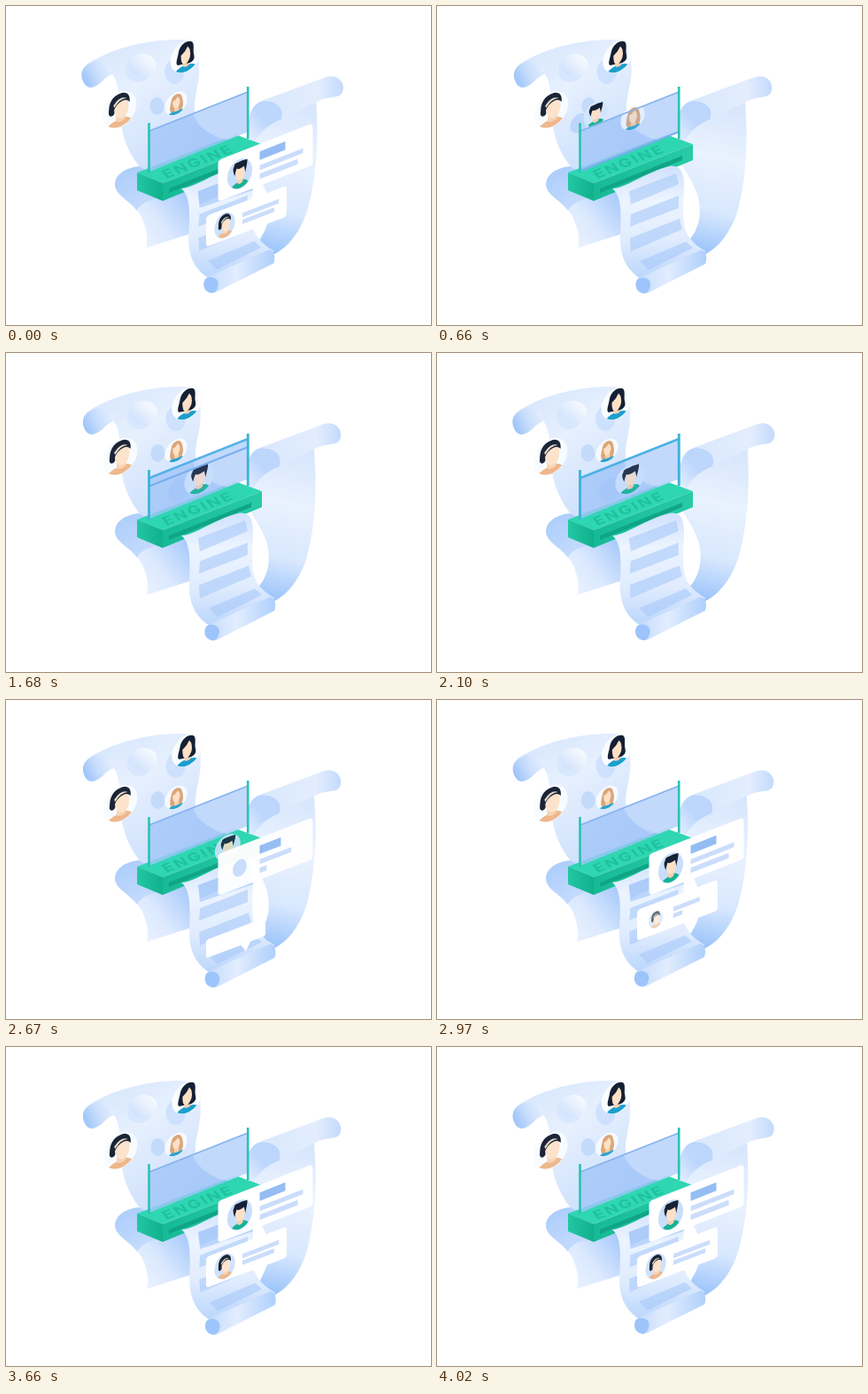
Write an HTML page that moves like this. It is 480 px wide and 360 px high and loops after 4.05 s.

```html
<!DOCTYPE html>
<html lang="en">
<head>
<meta charset="utf-8">
<title>Engine</title>
<style>
html, body { margin: 0; width: 100%; height: 100%; overflow: hidden; background: #fff; }
svg { display: block; width: 100vw; height: 100vh; }
text { font: bold 18.5px Inter, Arial, sans-serif; letter-spacing: 2.4px; }
</style>
</head>
<body>
<svg viewBox="0 0 480 360">
<defs>
  <linearGradient id="curl" x1="0" y1=".7" x2="1" y2=".3"><stop stop-color="#9ac3fa"/><stop offset=".45" stop-color="#c6dcfc"/><stop offset="1" stop-color="#e6effe"/></linearGradient>
  <linearGradient id="sheet" x1="0" y1="0" x2=".7" y2="1"><stop stop-color="#d3e4fd"/><stop offset=".4" stop-color="#e6f0fe"/><stop offset="1" stop-color="#c8dcfc"/></linearGradient>
  <linearGradient id="under" x1="0" y1=".9" x2="1" y2=".1"><stop stop-color="#f4f8ff"/><stop offset=".45" stop-color="#dbe9fe"/><stop offset="1" stop-color="#8ebafa"/></linearGradient>
  <linearGradient id="fold" x1="0" y1="0" x2="1" y2=".5"><stop stop-color="#94c0fa"/><stop offset=".5" stop-color="#accdfb"/><stop offset="1" stop-color="#c5dcfc"/></linearGradient>
  <linearGradient id="right" x1=".4" y1="0" x2=".3" y2="1"><stop stop-color="#d7e6fd"/><stop offset=".35" stop-color="#e9f2fe"/><stop offset=".7" stop-color="#d9e8fe"/><stop offset="1" stop-color="#96c1fa"/></linearGradient>
  <linearGradient id="rightRoll"><stop stop-color="#d9e8fd"/><stop offset=".7" stop-color="#e3edfe"/><stop offset="1" stop-color="#c3dafc"/></linearGradient>
  <linearGradient id="rightCurl" x1="0" y1="1" x2="1" y2="0"><stop stop-color="#e6f0fe"/><stop offset=".5" stop-color="#bcd6fc"/><stop offset="1" stop-color="#bcd6fc"/></linearGradient>
  <linearGradient id="front" x1="0" y1="0" x2="0" y2="1"><stop stop-color="#cfe1fd"/><stop offset=".3" stop-color="#ecf4ff"/><stop offset=".65" stop-color="#e0ecfe"/><stop offset="1" stop-color="#b9d5fc"/></linearGradient>
  <linearGradient id="frontRoll"><stop stop-color="#c3dafc"/><stop offset=".45" stop-color="#e2edfe"/><stop offset="1" stop-color="#aecffc"/></linearGradient>
  <linearGradient id="glass"><stop stop-color="#a9caf8"/><stop offset="1" stop-color="#a3c7f8"/></linearGradient>
  <linearGradient id="shade" x1="1" y1="0" x2="0" y2="1"><stop stop-color="#fff"/><stop offset=".6" stop-color="#dfebfd"/><stop offset="1" stop-color="#cadefc"/></linearGradient>
  <linearGradient id="end"><stop stop-color="#22c7a2"/><stop offset="1" stop-color="#10b08b"/></linearGradient>
  <linearGradient id="side"><stop stop-color="#16ba95"/><stop offset="1" stop-color="#28cba7"/></linearGradient>
  <clipPath id="disc"><circle r="19.5"/></clipPath>

  <g id="girl">
    <g clip-path="url(#disc)">
      <path d="M-16 20C-13 12-6 11 0 11S14 12 18 20Z" fill="#1c9fce"/>
      <path d="M-3 5H5V12Q1 15-3 12Z" fill="#f6cfae"/>
    </g>
    <path d="M-9 8C-15 7-10-2-9-9C-7-18 2-20 7-17C13-14 10-6 11 0C12 5 13 9 6 10Z" fill="#142034"/>
    <path d="M-6-3Q0-6 3-12Q8-6 6 3Q2 12-3 9Q-6 6-6-3Z" fill="#fde0c6"/>
  </g>
  <g id="capman">
    <g clip-path="url(#disc)">
      <path d="M-18 21C-15 12-6 12 0 10S14 12 18 20Z" fill="#eeb78c"/>
      <path d="M-4 4H7V12Q1 16-4 12Z" fill="#f7d3b4"/>
    </g>
    <ellipse cx="-9" cy="0" rx="3.500" ry="4.500" fill="#1b2537"/>
    <path d="M-6-6Q2-12 10-7Q12 2 8 8Q2 13-3 7Q-7 1-6-6Z" fill="#fde3cb"/>
    <path d="M-12-1C-13-11-8-18 1-18C9-18 13-12 12-5Q9-9 4-9Q-4-8-7 0Z" fill="#1b2537"/>
    <path d="M-7-7Q1-16 9-10Q1-13-6-4Z" fill="#e9dac6"/>
  </g>
  <g id="woman">
    <g clip-path="url(#disc)">
      <path d="M-16 21C-13 12-6 13 0 12S14 13 17 21Z" fill="#2aa3cc"/>
      <path d="M-9 13C-13 7-9-4-8-9C-6-18 7-19 10-10C12-3 15 7 10 14Z" fill="#dca678"/>
      <path d="M-3 5H5V14H-3Z" fill="#f6cfae"/>
    </g>
    <path d="M-6-5Q0-6 3-11Q8-6 7 1Q4 10 0 9Q-6 7-6-5Z" fill="#fde0c6"/>
  </g>
  <g id="boy">
    <g clip-path="url(#disc)">
      <path d="M-16 21C-13 11-6 12 0 10S14 11 17 21Z" fill="#16b295"/>
      <path d="M-4 4H5V12Q0 16-4 12Z" fill="#f6cfae"/>
    </g>
    <path d="M-7-7Q0-10 8-7Q9 2 6 7Q1 11-4 7Q-7 2-7-7Z" fill="#fde0c6"/>
    <path d="M-8 1C-10-4-12-9-9-12C-9-17-3-15 1-16C5-17 9-15 12-16C13-11 10-5 9 1Q8-4 7-8Q-1-5-5-8Q-7-4-8 1Z" fill="#162135"/>
  </g>
</defs>

<g id="left">
  <path d="M87 83C83 70 95 63 106 58C130 46 170 36 205 38.500C219 41 219 56 219 73C218 96 209 112 216 127C223 143 240 150 254 156L159 190C145 177 133 156 130 132C128 112 130 86 120 76C112 78 108 90 97 92Q90 92 87 83Z" fill="url(#sheet)"/>
  <path d="M87 83C83 70 95 62 106 62C117 63 123 70 121 77C112 79 108 90 97 92Q90 92 87 83Z" fill="url(#curl)"/>
  <circle cx="150" cy="72" r="14" fill="#d3e4fd" opacity=".7"/>
  <ellipse cx="155" cy="67" rx="15" ry="13" fill="url(#shade)"/>
  <ellipse cx="191" cy="74" rx="11" ry="14" fill="#c8ddfc" opacity=".8"/>
  <ellipse cx="171" cy="113" rx="8" ry="10" fill="#c3dafb"/>
  <g transform="matrix(.85 -.31 0 .88 203.500 57)"><circle r="20" fill="#fbfdff"/><use href="#girl"/></g>
  <g transform="matrix(.97 -.34 0 1 128.500 117)"><circle r="20" fill="#f9fcff"/><use href="#capman"/></g>
</g>

<g id="lower">
  <path d="M150 181C132 183 120 193 124 206C129 219 150 222 157 247Q162 261 159 273L212 256L214 208L176 198Z" fill="url(#under)"/>
  <path d="M150 181C132 183 120 193 124 206C128 215 139 219 148 231C156 216 176 219 188 210L172 192Z" fill="url(#fold)" opacity=".7"/>
</g>

<g id="rightPaper">
  <path d="M276 118L349 104C353 150 350 196 340 231C331 259 315 275 301 281L283 266C297 253 300 232 295 214C290 198 282 188 274 174Z" fill="url(#right)"/>
  <path d="M274 150C270 130 275 108 291 107C307 107 315 118 310 128C298 132 287 141 280 153Z" fill="url(#rightCurl)"/>
  <path d="M288 107L361 80C375 76 384 89 378 99C373 105 361 101 349 109L310 127C314 115 304 106 288 107Z" fill="url(#rightRoll)"/>
</g>

<g>
  <path d="M148 188L259 145L289 156L177 200Z" fill="#2fd6b2"/>
  <path d="M148 188L177 200V220L148 208Z" fill="url(#end)"/>
  <path d="M177 200L289 156V174L177 220Z" fill="url(#side)"/>
  <path d="M184 206L277 169V174L184 211Z" fill="#0fa585"/>
  <text transform="matrix(.93 -.37 .5 .62 181 195)" fill="#1fc19f">ENGINE</text>
</g>

<path d="M162 141L273 97V142L162 187Z" fill="url(#glass)" opacity=".75"/>
<path d="M211 122L273 97V142L250 151C231 146 216 137 211 122Z" fill="#d8e7fd" opacity=".65"/>

<g id="womanMove">
  <circle r="20" fill="#f6faff"/>
  <use href="#woman"/>
</g>
<g id="boyMove">
  <ellipse id="boyShadow" cx="-27" cy="5" rx="15" ry="16" fill="#a9c9f8"/>
  <circle r="20" fill="#d3e5fd"/>
  <use href="#boy"/>
</g>

<path d="M162 141L273 97V142L162 187Z" fill="#83b1f3" opacity=".15"/>
<path d="M162 141L273 97" stroke="#83b2ee" stroke-width="1.6"/>
<path id="scan" d="M162 141L273 97" stroke="#78aeef" stroke-width="2"/>
<path d="M161.500 132V188M273.200 91V150" stroke="#28c3b0" stroke-width="2.600"/>
<path id="glow" d="M161.500 132V188M273.200 91V150M162 141L273 97" stroke="#45b0e4" stroke-width="2.600"/>

<g id="frontPaper">
  <path d="M198 206C212 206 237 187 262 181C276 178 280 190 279 207C278 228 276 249 285 261Q291 270 304 277L232 309C216 300 208 286 207 267C207 244 211 216 198 206Z" fill="url(#front)"/>
  <g fill="#a9cafa" opacity=".6">
    <path d="M217 209L270 189L273 201L219 224Z"/>
    <path d="M219 235L273 214L273 228L218 249Z"/>
    <path d="M218 262L274 240L277 252L219 277Z"/>
    <path d="M229 288L281 266L289 273L239 298Z"/>
  </g>
  <path id="cardShadow" d="M217 209L278 186L279 208L219 228Z" fill="#a3c7fa"/>
  <path d="M232 305L297 276C304 274 306 286 303 291L240 323C231 328 222 318 226 309Z" fill="url(#frontRoll)"/>
  <path d="M226 309C231 304 241 307 241 314C241 320 238 324 234 324.500C226 324 222 316 226 309Z" fill="#9dc5fb"/>
</g>

<g id="card2">
  <path d="M4-35H87Q91-35 91-31V-4Q91 0 87 0H68L61 15L53 0H4Q0 0 0-4V-31Q0-35 4-35Z" fill="#fff"/>
  <g class="bars" fill="#cbddfb"><rect x="41" y="-23" width="41" height="5"/><rect x="41" y="-15.500" width="36" height="5"/></g>
</g>
<g id="face2"><circle r="20" fill="#cfe1fc"/><use href="#capman"/></g>

<g id="card1">
  <rect width="107" height="47" rx="4" fill="#fff"/>
  <g class="bars" fill="#cbddfb"><rect x="47" y="8.500" width="29" height="9.500" fill="#94bdf3"/><rect x="47" y="24" width="49" height="5.500"/><rect x="47" y="33.500" width="43" height="6"/></g>
</g>
<circle id="spot" r="20" fill="#c9defb"/>
<g id="face1" ><use href="#boy" transform="matrix(.7 -.26 0 .84 264 189)"/></g>
</svg>

<script>
const LOOP = 4050;
const el = id => document.getElementById(id);
const set = (id, transform, opacity = 1) => {
  el(id).setAttribute('transform', transform);
  el(id).setAttribute('opacity', opacity);
};
const bars = ['card1', 'card2'].map(id => [...el(id).querySelectorAll('.bars rect')]
  .map(bar => ({ bar, width: +bar.getAttribute('width') })));
const mix = (a, b, p) => a + (b - a) * p;
const wave = (p, peak) => Math.cos(2 * Math.PI * (p - peak));

// Places a round picture on the slanted plane.
const tilt = (x, y, w, h = w) => `matrix(${w} ${-.37 * w} 0 ${h} ${x} ${y})`;

function ease(t, a, b) {
  const p = Math.min(1, Math.max(0, (t - a) / (b - a)));
  return p * p * (3 - 2 * p);
}

// Leans a paper sideways by dx at height y, keeping height y0 fixed.
function sway(id, y0, y, dx, stretch = 0) {
  const k = dx / (y - y0), s = k * stretch;
  set(id, `matrix(1 0 ${k} ${1 + s} ${-k * y0} ${-s * y0})`);
}

function draw(t) {
  const p = t * 4 / LOOP % 1;
  sway('left', 185, 78, -.8 * wave(p, .08));
  sway('lower', 190, 272, wave(p, .4));
  sway('rightPaper', 280, 90, 1.6 * wave(p, .14));
  sway('frontPaper', 185, 320, .3 + 2.2 * wave(p, .38), .5);

  // The woman is checked and sent back, then the boy is let through.
  const w = ease(t, 180, 600) - ease(t, 760, 1150);
  set('womanMove', tilt(mix(192, 221, w), mix(110, 126, w), mix(.63, .68, w)));

  const come = ease(t, 720, 1160), go = ease(t, 2320, 2860);
  const x = mix(mix(179, 218, come), 263, go);
  const y = mix(mix(122, 142, come), 176, go);
  const size = mix(mix(.68, .83, come), .68, go) * ease(t, 380, 600);
  set('boyMove', tilt(x, y, size), 1 - ease(t, 2600, 2900));
  el('boyShadow').setAttribute('opacity', .6 * (1 - ease(t, 2320, 2600)));

  const scan = ease(t, 100, 660) - ease(t, 660, 2100);
  set('scan', `translate(0 ${45 * scan})`, scan > 0 ? 1 : 0);
  set('glow', '', .9 * (ease(t, 900, 1900) - ease(t, 2200, 2550)));

  const show = (a, b) => t < 1000 ? 1 - ease(t, 120, 420) : ease(t, a, b);
  const c1 = show(2350, 2710), c2 = show(2560, 2900);
  set('card1', `matrix(1 -.39 0 1 239.5 174) translate(0 ${4 * (1 - c1)})`, c1);
  set('cardShadow', '', .65 * c1);
  set('card2', `matrix(1 -.38 0 1 226 ${mix(298, 272, c2)}) scale(${mix(.65, 1, c2)} ${mix(.45, 1, c2)})`,
    Math.min(1, c2 * 5));
  const starts = [[2480, 2500, 2600], [2800, 2880]];
  bars.forEach((group, i) => group.forEach(({ bar, width }, j) => {
    const start = starts[i][j];
    bar.setAttribute('width', width * show(start, start + 260));
  }));

  const spot = show(2540, 2780);
  set('spot', tilt(264, 189.5, .7 * spot, .84 * spot));
  set('face1', '', show(2740, 2950));
  const face2 = show(2820, 3060);
  set('face2', tilt(247, 247.5, .58 * face2, .7 * face2), face2);
}

const start = performance.now();
function tick() {
  draw((performance.now() - start) % LOOP);
  requestAnimationFrame(tick);
}
tick();
</script>
</body>
</html>
```
